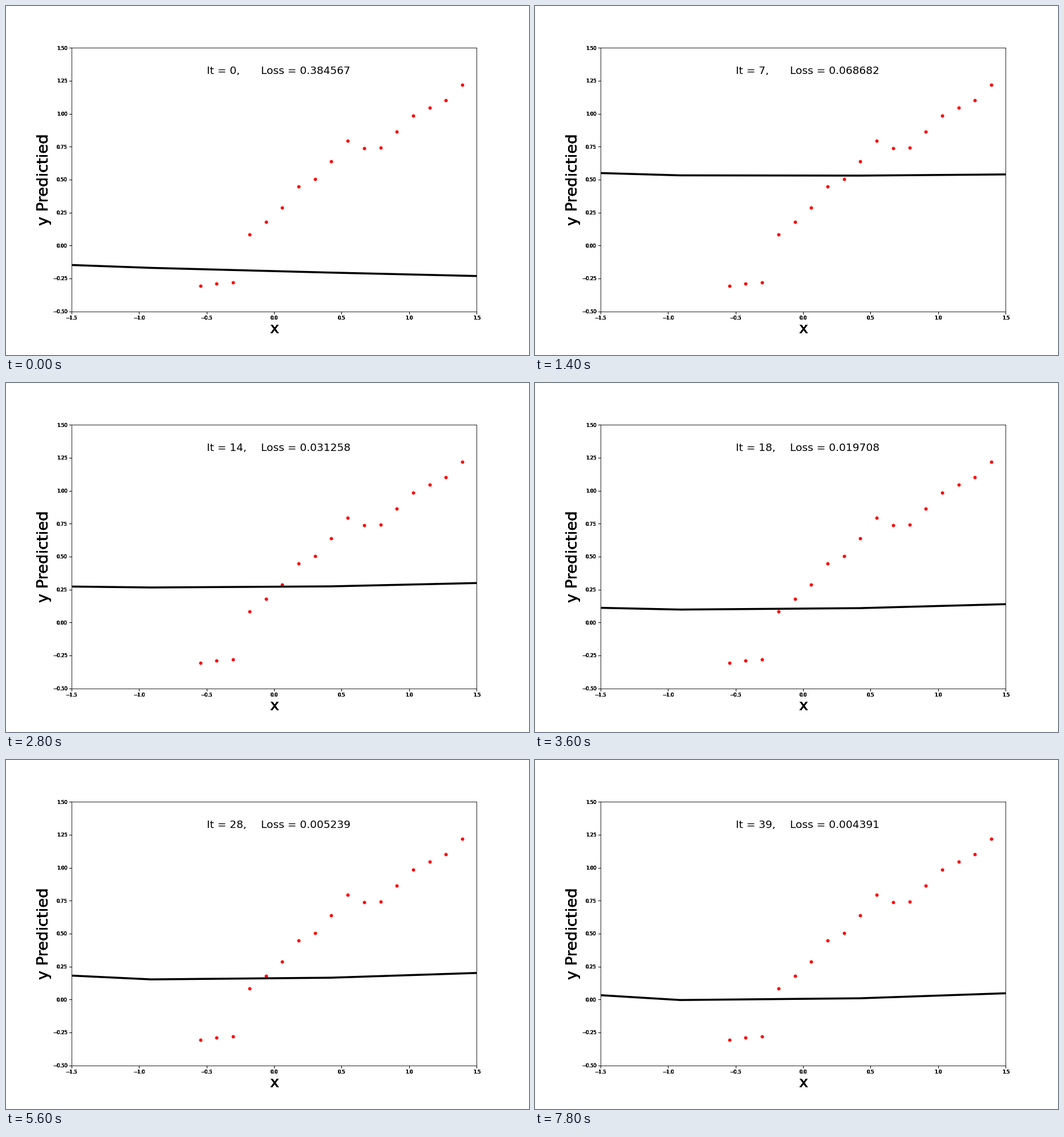
These frames come from a looping animation (917 by 611 pixels, 8 s). A matplotlib script:

```python
import numpy as np
import matplotlib.pyplot as plt
from matplotlib.animation import FuncAnimation

W, H = 917, 611
DPI = H / 8
FRAMES, INTERVAL = 40, 200
RECT = [0.125, 0.125, 0.775, 0.755]
LAYERS = 8  # stacked axes give the labels their heavy, saturated edges

plt.rcParams["font.family"] = "DejaVu Sans"

# scattered samples
point_x = -2 + 4 * np.arange(12, 29) / 33
point_y = [-0.307, -0.288, -0.281, 0.084, 0.179, 0.286, 0.448, 0.503, 0.639,
           0.793, 0.738, 0.743, 0.864, 0.985, 1.044, 1.103, 1.220]

# the curve bends at two joints and swings between a few turning points
LEFT, MIDDLE, RIGHT = -0.909, 0.06, 0.42
curve_x = np.array([-1.5, LEFT, MIDDLE, RIGHT, 1.5])
turns = [(-7.5, -0.927), (7.5, 0.535), (19, 0.098), (28, 0.162), (40, 0.003)]

loss_points = [(0, 0.384567), (4, 0.054609), (10, 0.086382), (14, 0.031258),
               (23, 0.011073), (33, 0.002479), (39, 0.004391)]


def level(it):
    """Cosine easing from one turning point to the next."""
    for (t0, v0), (t1, v1) in zip(turns, turns[1:]):
        if it <= t1:
            u = (it - t0) / (t1 - t0)
            return v0 + (v1 - v0) * (1 - np.cos(np.pi * u)) / 2


def curve(it):
    left = np.interp(it, [4, 14, 33], [-0.037, -0.012, -0.062])
    middle = 0.010 - 0.037 * np.exp(-it / 6)
    right = 0.036 - 0.060 * np.exp(-it / 9)
    return (level(it)
            + left * np.minimum(curve_x - LEFT, 0)
            + middle * (np.clip(curve_x, LEFT, RIGHT) - MIDDLE)
            + right * np.maximum(curve_x - RIGHT, 0))


def loss(it):
    keys, values = zip(*loss_points)
    return np.exp(np.interp(it, keys, np.log(values)))


def add_axes(index):
    ax = fig.add_axes(RECT, label=f"layer{index}")
    ax.patch.set_visible(False)
    ax.spines[:].set_visible(index == LAYERS - 1)
    ax.set(xlim=(-1.5, 1.5), ylim=(-0.5, 1.5))
    ax.set_xticks(np.arange(-1.5, 1.6, 0.5))
    ax.set_yticks(np.arange(-0.5, 1.6, 0.25))
    ax.tick_params(labelsize=8, pad=3)
    ax.set_xlabel("x", fontsize=25.7, labelpad=2)
    ax.set_ylabel("y Predictied", fontsize=25.7, labelpad=2)
    return ax


fig = plt.figure(figsize=((W + 1e-6) / DPI, H / DPI), dpi=DPI, facecolor="white")
for i in range(LAYERS):
    ax = add_axes(i)

ax.plot(point_x, point_y, "o", color="red", markersize=5, markeredgewidth=0.5)
line, = ax.plot(curve_x, curve(0), color="black", linewidth=3.3, zorder=3)
count_text = ax.text(-0.5, 1.3, "", fontsize=17.5)
loss_text = ax.text(-0.098, 1.3, "", fontsize=17.5)


def update(it):
    line.set_ydata(curve(it))
    count_text.set_text(f"It = {it},")
    loss_text.set_text(f"Loss = {loss(it):.6f}")
    return line, count_text, loss_text


anim = FuncAnimation(fig, update, frames=FRAMES, interval=INTERVAL,
                     repeat=True, repeat_delay=0, blit=False)
plt.show()
```
